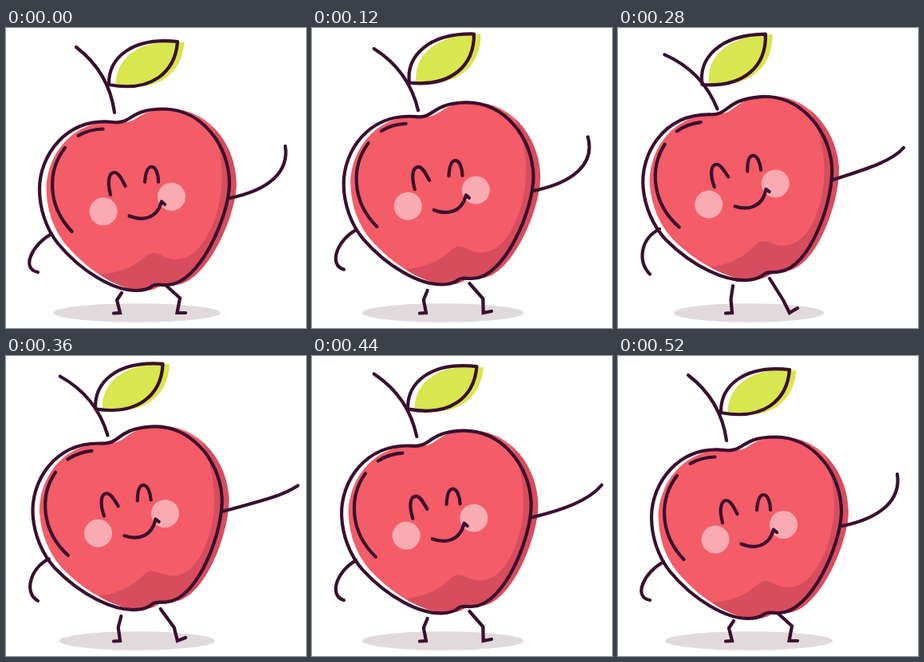
Recreate the animation shown at these times as an HTML page. Size 376 by 376 pixels, loop 560 ms.

```html
<!DOCTYPE html>
<html lang="en">
<head>
<meta charset="utf-8">
<title>Waving apple</title>
<style>
  html, body { margin: 0; width: 100%; height: 100%; overflow: hidden; background: #fff; }
  svg { display: block; width: 100vw; height: 100vh; }
  .line { fill: none; stroke: #3a0f2f; stroke-width: 4.2; stroke-linecap: round; stroke-linejoin: round; }
  .leg { stroke-linejoin: miter; }
</style>
</head>
<body>
<svg viewBox="0 0 376 376">
  <defs>
    <path id="skin" d="M134 118C158 121 154 101.5 197 101.5C246 101.5 280 148 280 195C280 235 242 322 202 322C196 323 189 320 184 323C179 327 172 329 163 329C135 329 95 306 65 270C50 251 42 226 42 202C42 160 75 112 134 118Z"/>
    <path id="blade" d="M129 71C128 38 157 11 215 17C212 56 182 81 129 71Z"/>
    <clipPath id="flesh"><use href="#skin" x="8.7"/></clipPath>
  </defs>

  <ellipse id="shadow" cx="164" cy="357" rx="105" ry="11.8" fill="#e1dadd"/>

  <g id="body">
    <use href="#skin" x="8.7" fill="#f45c67"/>
    <path clip-path="url(#flesh)" fill="#d74d5d" d="M258 122C277 165 275 224 250 264C240 281 227 290 213 290C200 290 194 282 184 282C173 282 168 304 118 309L150 345H300V122Z"/>
    <g fill="#faabb2">
      <circle cx="122" cy="230" r="17.5"/>
      <circle cx="207.5" cy="211.5" r="17.5"/>
    </g>
    <g class="line">
      <use href="#skin"/>
      <path d="M74 150C52 178 51 222 82.5 255M90.5 135Q104 127 121.5 126.5"/>
      <path d="M131 209C126 190 130 181 136 181C141 181 145 189 149.5 198M174 193C175 180 178 174 182.5 174C188 174 191 184 191 193"/>
      <path d="M154.5 235.5C170 242 189 240 195 217.5L199 221"/>
    </g>
  </g>

  <g id="leaf">
    <use href="#blade" x="8.5" y="1" fill="#d8e64f"/>
    <use href="#blade" class="line"/>
  </g>
  <path id="stem" class="line" d="M88 24C118 47 132 77 136 106"/>

  <path id="leftArm" class="line"/>
  <path id="rightArm" class="line"/>
  <path id="leftLeg" class="line leg"/>
  <path id="rightLeg" class="line leg"/>
</svg>
<script>
const LOOP = 560, STEP = 40, START = 40;

// Every value is rest + lean * (steady there and back) + hop * (rounded jump) + sway * (sine)
const rigid = {   // pivot x, pivot y, angle
  body: { rest: [164.75, 220.75, 0], lean: [-9.25, 0, -5.2], hop: [0, -12.75, 0], sway: [1.3, -0.5, 0.7] },
  leaf: { rest: [129, 71, 0], lean: [-22.5, 16, -6.5], hop: [-1, -16, 0], sway: [1.1, 1.3, -3.1] },
  stem: { rest: [136, 106, 0], lean: [-11.5, 6.5, -13.8], hop: [0, -11, 0], sway: [1, 1.3, -0.75] }
};
const arms = {    // one cubic curve each
  leftArm: {
    rest: [57, 258, 33, 271, 18, 302, 40, 306],
    lean: [-5, 0, -6, 0, 7, -9, 0, 14],
    hop: [0, -6, 0, -6, 0, 0, 0, -11.5],
    sway: [0, -1.7, 0, -2, 0, -1.7, 0, -1.9]
  },
  rightArm: {
    rest: [281, 213, 330, 203, 355, 180, 350, 148],
    lean: [-11, -12.5, -30, -15, -13, -11, 0, 0],
    hop: [0, -10.5, 0, -8, 0, 0, 8, 2],
    sway: [1.2, 1, 7.8, 0.5, 5, -6.5, -10, -14.6]
  }
};
const legs = {    // hip, knee, heel, toe
  leftLeg: { rest: [145, 332, 139, 341, 143, 357, 135, 357.5], lean: [-1, -9, 2.5, -1] },
  rightLeg: { rest: [201, 323, 218, 338.5, 214.5, 357, 225, 357], lean: [-11, -9, -11, 2.5, 0.5, 0, 0, -6] }
};

const $ = id => document.getElementById(id);

function draw(ms) {
  const t = Math.max(START, Math.floor(ms % LOOP / STEP) * STEP);
  const u = (t - START) / (LOOP - STEP - START);
  const lean = 1 - Math.abs(2 * u - 1);
  const hop = lean * (2 - lean);
  const sway = Math.sin(2 * Math.PI * u);
  const pose = part => part.rest.map((v, i) =>
    v + lean * (part.lean[i] || 0) + hop * (part.hop?.[i] || 0) + sway * (part.sway?.[i] || 0));

  for (const id in rigid) {
    const [px, py] = rigid[id].rest, [x, y, angle] = pose(rigid[id]);
    $(id).setAttribute("transform", `translate(${x} ${y}) rotate(${angle}) translate(${-px} ${-py})`);
  }
  for (const id in arms) {
    const [x, y, ...rest] = pose(arms[id]);
    $(id).setAttribute("d", `M${x} ${y}C${rest.join(" ")}`);
  }
  for (const id in legs) $(id).setAttribute("d", "M" + pose(legs[id]).join(" "));
  $("shadow").setAttribute("rx", 105 - 11 * lean);
}

const begin = performance.now();
function tick() {
  draw(performance.now() - begin);
  requestAnimationFrame(tick);
}
tick();
</script>
</body>
</html>
```
